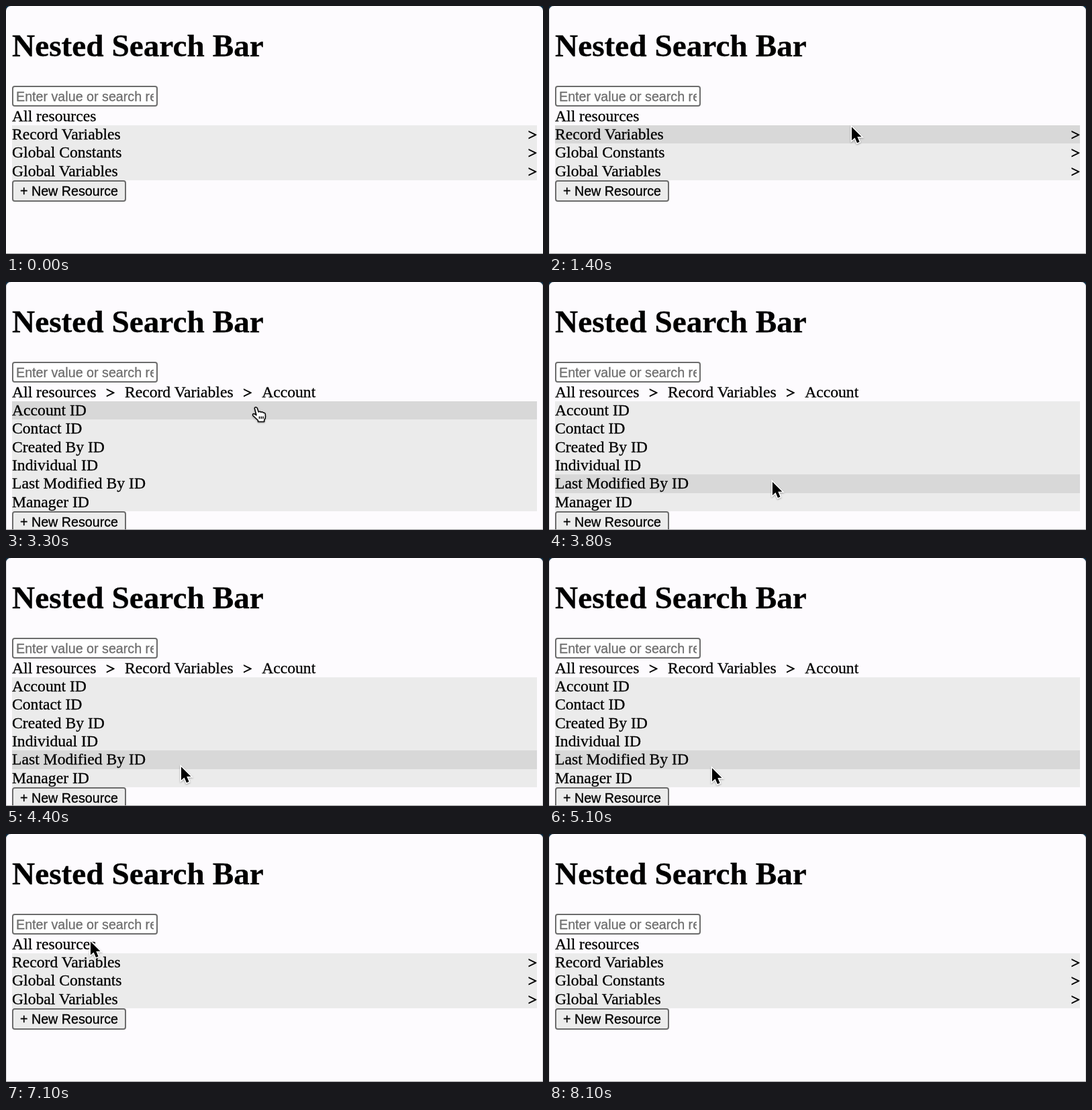
An HTML page for the animation above (9400 ms loop, 800 px wide and 370 px high).

```html
<!DOCTYPE html>
<html lang="en">
<head>
<meta charset="utf-8">
<title>Nested Search Bar</title>
<style>
  html, body { margin: 0; width: 100%; height: 100%; overflow: hidden; background: #0b2a40; }
  * { box-sizing: border-box; }
  #page {
    position: relative; width: 800px; height: 370px; overflow: hidden;
    background: #fdfbfe; border-radius: 7px 7px 0 0; color: #000;
    font: 23.65px/27.35px "Liberation Serif", Times, serif; white-space: nowrap;
    -webkit-text-stroke: .3px;
  }
  #page.active { box-shadow: inset 1px 0 #d8d6da, inset -1px 0 #d8d6da; }
  #page::after {
    content: ""; position: absolute; left: 0; top: 369px; width: 800px; height: 1px; background: #9c9b9e;
  }
  h1 { position: absolute; left: 9px; top: 32px; margin: 0; font-size: 47.3px; line-height: 54px; }
  .field, .button {
    border: 2px solid #6c6c6c; border-radius: 4px;
    font: 19.7px/28px "Liberation Sans", Arial, sans-serif;
  }
  .field {
    position: absolute; left: 9px; top: 119px; width: 217px; height: 31px;
    padding: 0 4px; background: #fff; color: #6e6e6e;
  }
  .field div { overflow: hidden; }
  .button { width: 170px; height: 32px; background: #ececec; text-align: center; }
  #panel { position: absolute; left: 9px; top: 150.6px; width: 782px; }
  i { position: relative; top: 1px; font-style: normal; -webkit-text-stroke: .9px; }
  .path i { margin: 0 14.6px; }
  .row { display: flex; justify-content: space-between; background: #ebebeb; }
  .row.hover { background: #d8d8d8; }
  svg { position: absolute; left: 0; top: 0; overflow: visible; filter: drop-shadow(0 1px 1px #0005); }
</style>
</head>
<body>
<div id="page">
  <h1>Nested Search Bar</h1>
  <div class="field"><div>Enter value or search resources...</div></div>
  <div id="panel"></div>
  <svg id="cursor" width="24" height="28">
    <path id="arrow" d="M0 .5V20.5L4.6 16.4 8 24.3 11.6 22.8 8.3 15H14.5Z"
      stroke="#fff" stroke-width="3" paint-order="stroke"/>
    <path id="hand" transform="translate(-6 -2)" fill="#fff" stroke="#000" stroke-width="1.5" stroke-linejoin="round"
      d="M4.3 3.2Q5.8 .2 8.2 3L10.3 9Q12.4 7.6 13.8 9.2 16 8.2 17.2 10 19.8 9.5 20.3 12L20.5 16Q20.5 19 18.7 21V23.5H9.5V21.5Q6 18 2 14.5 .7 12 3 11.4 5 11.8 7 13.8ZM11.5 15.5V19M14.3 15.5V19M17 15.5V19"/>
  </svg>
</div>
<script>
const LOOP = 9400, STEP = 100, TOP = 178, ROW = 27.35;
const $ = id => document.getElementById(id);

// linkEnd: right edge of the clickable part of the path
const views = [
  { path: ["All resources"], rows: ["Record Variables", "Global Constants", "Global Variables"], more: true, linkEnd: 0 },
  { path: ["All resources", "Record Variables"], rows: ["Account"], more: true, linkEnd: 134 },
  { path: ["All resources", "Record Variables", "Account"], linkEnd: 339,
    rows: ["Account ID", "Contact ID", "Created By ID", "Individual ID", "Last Modified By ID", "Manager ID"] }
];

function viewAt(t) {
  if (t < 1800 || t >= 7000) return views[0];
  return views[t >= 3200 && t < 5900 ? 2 : 1];
}

// Each move eases to (x, y) on a path that sags downwards.
const moves = [
  { from: 500, to: 1400, x: 451, y: 180, sag: 0 },
  { from: 2100, to: 2900, x: 372, y: 187, sag: 14 },
  { from: 3400, to: 4400, x: 261, y: 311, sag: 75 },
  { from: 4400, to: 5800, x: 225, y: 165, sag: 75 },
  { from: 6100, to: 6900, x: 126, y: 160, sag: 0 },
  { from: 7300, to: 8100, x: 400, y: 0, sag: 150 }
];

function pointer(t) {
  if (t < 500 || t >= 8100) return null;
  let x = 600, y = 362;
  for (const m of moves) {
    if (t < m.from) break;
    const k = Math.min(1, (t - m.from) / (m.to - m.from)), e = k * k * (3 - 2 * k);
    x += (m.x - x) * e;
    y += (m.y - y) * e + m.sag * Math.sin(Math.PI * e);
  }
  return { x, y };
}

function draw(t) {
  const view = viewAt(t), pos = pointer(t);
  const over = pos ? Math.floor((pos.y - TOP) / ROW) : -1;
  const rows = view.rows.map((name, i) =>
    `<div class="row${i === over ? " hover" : ""}">${name}${view.more ? "<i>&gt;</i>" : ""}</div>`);
  $("panel").innerHTML =
    `<div class="path">${view.path.join("<i>&gt;</i>")}</div>${rows.join("")}<div class="button">+ New Resource</div>`;
  $("page").classList.toggle("active", t >= 500);

  $("cursor").style.display = pos ? "" : "none";
  if (!pos) return;
  const onLink = over === -1 && pos.x < view.linkEnd;
  const hand = onLink || (t >= 1900 && t < 3500);
  $("cursor").style.transform = `translate(${pos.x}px, ${pos.y}px)`;
  $("hand").style.display = hand ? "" : "none";
  $("arrow").style.display = hand ? "none" : "";
}

const start = performance.now();
let last = -1;
function tick() {
  const t = Math.floor((performance.now() - start) % LOOP / STEP) * STEP;
  if (t !== last) draw(last = t);
  requestAnimationFrame(tick);
}
tick();
</script>
</body>
</html>
```
